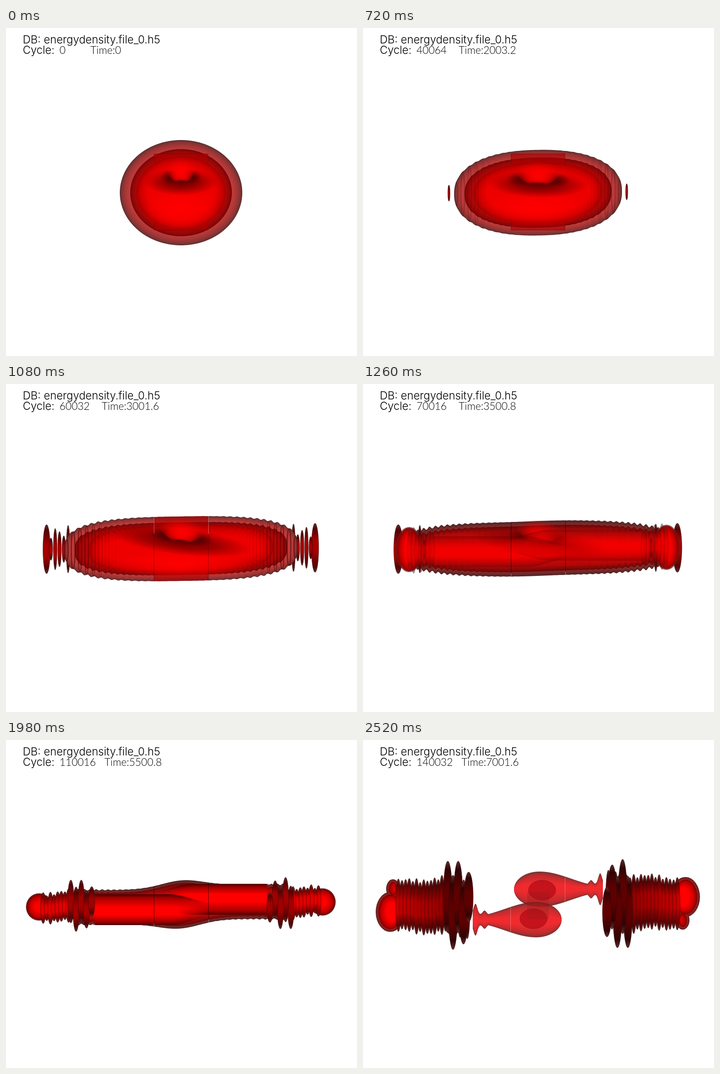
Write an HTML page with a canvas that moves like this. It is 774 px wide and 723 px high and loops after 2.7 s.

```html
<!DOCTYPE html>
<html lang="en">
<head>
<meta charset="utf-8">
<title>Energy density</title>
<style>
html, body { margin: 0; width: 774px; height: 723px; overflow: hidden; background: #fff; }
canvas { display: block; }
</style>
</head>
<body>
<canvas id="stage" width="774" height="723"></canvas>
<script>
const ctx = document.getElementById('stage').getContext('2d');
const CX = 385.5, CY = 362.5, STEP = 180, COUNT = 15;
const RED = '255,0,0', DARK = '60,0,0';
const lerp = (a, b, t) => a + (b - a) * t;
const clamp = v => Math.max(0, Math.min(1, v));
const smooth = (a, b, x) => { const t = clamp((x - a) / (b - a)); return t * t * (3 - 2 * t); };
const bell = (x, mid, w) => Math.exp(-(((x - mid) / w) ** 2));
const mix = (a, b, t) => `rgb(${a.map((v, i) => Math.round(lerp(v, b[i], t)))})`;

// Value of a quantity known at poses 6, 9, 11 and 14
function key(k, a, b, c, d) {
  if (k < 9) return lerp(a, b, (k - 6) / 3);
  return k < 11 ? lerp(b, c, (k - 9) / 2) : lerp(c, d, (k - 11) / 3);
}

function oval(x, y, rx, ry) {
  ctx.beginPath();
  ctx.ellipse(x, y, Math.max(rx, 0.5), Math.max(ry, 0.5), 0, 0, 7);
}

function glow(x, y, rx, ry, color, a) {
  ctx.save();
  ctx.translate(x, y);
  ctx.scale(rx, ry);
  const g = ctx.createRadialGradient(0, 0, 0, 0, 0, 1);
  [1, 0.6, 0].forEach((v, i) => g.addColorStop(i / 2, `rgba(${color},${a * v})`));
  ctx.fillStyle = g;
  ctx.fillRect(-1, -1, 2, 2);
  ctx.restore();
}

// Stack of shrinking outlines, shaded from rim to core
function shade(path, depth, rim, core) {
  for (let i = 0; i <= depth; i++) {
    path(i);
    ctx.fillStyle = mix(rim, core, Math.sqrt(i / depth));
    ctx.fill();
  }
}

function ramp(y0, y1, rim, side, core) {
  const g = ctx.createLinearGradient(0, y0, 0, y1);
  [rim, side, core, core, side, rim].forEach((c, i) =>
    g.addColorStop([0, 0.12, 0.42, 0.66, 0.88, 1][i], mix(c, c, 0)));
  return g;
}

// Body filled column by column, top and bottom given by fn
function skin(fn, x0, x1, colors, alpha = () => 1) {
  ctx.fillStyle = ramp(0, 1, ...colors);
  for (let x = Math.round(x0); x < x1; x++) {
    const [t, b] = fn(x + 0.5);
    if (b - t < 0.5) continue;
    ctx.save();
    ctx.globalAlpha *= clamp(alpha(x));
    ctx.translate(x, t);
    ctx.scale(1, b - t);
    ctx.fillRect(0, 0, 1, 1);
    ctx.restore();
  }
}

function disc(x, y, rx, ry, red) {
  ctx.fillStyle = ramp(y - ry, y + ry, [95, 45, 45], [red * 0.5, 4, 4], [red, 0, 0]);
  oval(x, y, rx, ry);
  ctx.fill();
  ctx.strokeStyle = 'rgba(45,10,10,.6)';
  ctx.stroke();
}

// The scene looks the same after half a turn
function twice(draw) {
  ctx.save();
  ctx.translate(2 * CX, 2 * CY);
  ctx.rotate(Math.PI);
  draw();
  ctx.restore();
  draw();
}

function eggSize(k) {
  const t = k / 6;
  return { rx: 135 + 122 * t ** 2.2, ry: 116 - 45 * t ** 1.8, n: 2 + t ** 3, t };
}

const eggHalf = (u, ry, n) => ry * (1 - clamp(Math.abs(u)) ** n) ** (1 / n);

function hole(k, strength) {
  const w = Math.min(50, 32 + 40 * (k / 6) ** 2), low = 338 + k * 1.3;
  const { rx } = eggSize(Math.min(k, 6));
  ctx.save();
  ctx.globalAlpha = strength;
  ctx.translate(386, low);
  ctx.rotate(0.12 * (Math.min(k, 6) / 6) ** 4);
  glow(0, 1, rx * 0.6, 30, '75,0,0', 0.85);
  for (const s of [-1, 1]) glow(s * w * 0.7, -9, w * 0.7, 16, DARK, 0.75);
  ctx.beginPath();
  ctx.moveTo(-w * 1.3, -50);
  ctx.quadraticCurveTo(-w, -10, -w * 0.4, 0);
  ctx.lineTo(w * 0.4, 0);
  ctx.quadraticCurveTo(w, -10, w * 1.3, -50);
  ctx.clip();
  glow(0, -19, w * 1.05, 30, RED, 1);
  glow(0, -14, w * 0.8, 18, RED, 0.8);
  glow(0, 0, w * 0.5, 4, DARK, 0.8);
  ctx.restore();
}

function egg(k, dx, dy) {
  const { rx, ry, n, t } = eggSize(k);
  const wave = k < 3 ? 0 : 4 * t * t, tilt = 0.015 * Math.min(1, k / 4);
  ctx.beginPath();
  for (let i = 0; i < 720; i++) {
    const a = i * Math.PI / 360, c = Math.cos(a);
    const u = Math.sign(c) * Math.abs(c) ** (2 / n);
    const ripple = wave * u * u * Math.sin(Math.abs(u) * rx * 0.42);
    const y = eggHalf(u, ry - dy, n) + ripple * Math.abs(Math.sin(a));
    ctx.lineTo(386 + u * (rx - dx), 363 + Math.sign(Math.sin(a)) * y - tilt * u * rx);
  }
  ctx.closePath();
}

// Thin plates thrown off both ends
function drawPlates(k) {
  const { rx } = eggSize(Math.min(k, 6));
  const left = CX - rx, tall = 15 + 15 * Math.min(2, k - 4);
  const outer = left - 11 - 3.5 * (k - 4) ** 3 * (k < 7 ? 1 : 0.42);
  twice(() => {
    for (let i = 0, x = outer; x < left + (k > 5 ? 14 : -4); x += 9.5, i++) {
      disc(x, 364, k < 5 ? 2.5 : i ? 4 : 2 * (k - 2), tall * (0.85 + 0.35 * Math.cos(i * 2.6)), 165);
    }
  });
}

function drawEgg(k) {
  const { rx, ry, n, t } = eggSize(k), s = t * t;
  if (k > 3) drawPlates(k);
  const layer = (dx, dy, ...look) => shade(i => egg(k, dx + i, dy + i), ...look);
  layer(0, 0, lerp(20, 12, s), [82, 45, 45], [190, 58, 58]);
  layer(23, 20 - 7 * s, 14, [105, 8, 8], [174, 6, 6]);
  ctx.save();
  egg(k, 0, 0);
  ctx.clip();
  ctx.fillStyle = 'rgba(172,0,0,.62)';
  ctx.fillRect(326, 277, 120, 169);
  ctx.strokeStyle = 'rgba(110,0,0,.45)';
  ctx.strokeRect(326.5, 277.5, 119, 168);
  layer(37 + 18 * s, 36 - 16 * s, 26, [158, 0, 0], [238, 0, 0]);
  glow(386, 398, rx * 0.62, ry * 0.42, RED, 1);
  // Folds near the ends
  for (let x = rx - 4; x > rx * 0.55 && k > 3; x -= 15) {
    const u = x / rx;
    ctx.strokeStyle = `rgba(80,0,0,${0.6 * s * smooth(0.5, 0.95, u)})`;
    ctx.lineWidth = 2.5;
    for (const side of [-1, 1]) {
      oval(386 + side * x, 363 - side * 3, 4, eggHalf(u, ry, n));
      ctx.stroke();
    }
  }
  ctx.lineWidth = 1;
  hole(k, 1);
  if (k > 5) for (const x of [326, 446]) {
    ctx.fillStyle = 'rgba(225,185,175,.5)';
    ctx.fillRect(x, 290, 1, 40);
    ctx.fillStyle = 'rgba(90,0,0,.5)';
    ctx.fillRect(x, 330, 1, 110);
  }
  ctx.restore();
}

function drawShell(k) {
  const s = clamp((k - 6) / 3), rx = CX - key(k, 128, 57, 44, 28);
  const x0 = key(k, 128, 90, 150, 150), x1 = 2 * CX - x0;
  const swell = key(k, 0, 4, 15, 15), amp = lerp(4, 2, s);
  const body = inset => x => {
    const d = Math.abs(x - CX), u = d / rx;
    const mid = CY + key(k, 1, 6, 6, 6) * Math.tanh((CX - x) / 70);
    const thin = 38 + swell * bell(x, CX, 65) + 10 * u ** 8;
    const ripple = amp * (d / (CX - x0)) ** 2 * Math.sin(d * 0.48);
    const half = lerp(eggHalf(u, 71, 3), thin, s) + ripple - inset;
    return [mid - half, mid + half];
  };
  ctx.save();
  ctx.globalAlpha = clamp(1 - (k - 11) * 0.55);
  skin(body(0), x0, x1, [[75, 38, 38], [165, 45, 45], [190, 40, 40]]);
  skin(body(key(k, 13, 3, 6, 6)), x0 + 6, x1 - 6, [[100, 8, 8], [175, 8, 8], [235, 0, 0]]);
  ctx.restore();
  return body(0);
}

// Front lobe: a tube that pinches into a bulb with a neck
function drawTube(k) {
  const g = clamp((k - 11) / 3);
  const x0 = key(k, 150, 135, 187, 242), end = key(k, 470, 500, 448, 438);
  const mid = key(k, 370, 369, 374, 396);
  const edge = x => {
    const plain = 34 * (1 - 0.55 * smooth(360, 455, x));
    const lobe = x < 382 ? bell(x, 382, 98) : Math.sqrt(clamp(1 - ((x - 382) / 56) ** 2));
    const foot = 24 * bell(x, 248, 6) + 9 * bell(x, 268, 6);
    const bulb = Math.max(39 * lobe, x < 382 ? 11 + foot : 0);
    const half = lerp(plain, bulb, g);
    return [mid - half, mid + half];
  };
  const tone = (a, b) => a.map((v, i) => lerp(v, b[i], g));
  ctx.save();
  ctx.globalAlpha = clamp((k - 6) / 3) * lerp(1, 0.92, g);
  skin(edge, x0, end, [
    tone([75, 0, 0], [105, 35, 35]), tone([165, 0, 0], [190, 25, 28]), tone([255, 0, 0], [238, 24, 28])
  ], x => k > 11 ? 1 : Math.min((end - x) / 70, (x - x0) / 12));
  ctx.globalAlpha = g;
  oval(376, 394, 30, 22);
  ctx.fillStyle = 'rgba(165,0,14,.55)';
  ctx.fill();
  ctx.strokeStyle = 'rgba(115,15,15,.5)';
  ctx.stroke();
  ctx.fillStyle = 'rgba(235,150,150,.6)';
  ctx.fillRect(325, mid - 27, 1, 54);
  ctx.restore();
}

function drawHead(k) {
  const g = clamp((k - 11) / 3), tip = key(k, 79, 57, 44, 28), end = key(k, 160, 150, 186, 238);
  const mid = key(k, 365, 365, 368, 366), r = key(k, 30, 30, 29, 32), tall = key(k, 50, 50, 30, 44);
  const start = tip + key(k, 32, 32, 38, 50);
  const near = key(k, 48, 48, 31, 55), far = key(k, 40, 40, 36, 66);
  const rim = [80, 35, 35], film = [160, 30, 30];
  ctx.save();
  ctx.globalAlpha = clamp((k - 6) / 2);
  // Rounded cap, with a second bump when it splits
  const lobes = [[tip + r, mid + 13 * g, r, tall], [tip + 38, mid - 38 * g, 15 * g, 21 * g]];
  const inset = lerp(2, 6, g);
  for (const [x, y, rx, ry] of lobes) shade(i => oval(x, y, rx - i, ry - i), inset, rim, film);
  for (const [x, y, rx, ry] of lobes) {
    shade(i => oval(x + i * 0.3, y, rx - inset - i, ry - inset - i * 1.3), 14, [110, 0, 0], [255, 0, 0]);
  }
  for (let x = start; x < end; x += 8) {
    const t = (x - start) / (end - start);
    disc(x, mid + 3 * Math.sin(x * 7), 6, lerp(near, far, t) + 4 * Math.sin(x * 12.9),
      lerp(225, 120, g * (0.3 + 0.7 * t)));
  }
  // Tall flare behind the stack
  for (let i = 0; i < 5 && k > 10; i++) {
    const y = lerp(366, i % 2 ? 380 : 346, lerp(0.5, 1, g));
    disc(187 + 11.5 * i - 44 * (1 - g), y, lerp(7, 10, g),
      (82 - 3 * (i - 1) ** 2) * lerp(0.6, 1, g), lerp(160, 95, g));
  }
  ctx.restore();
}

function drawStretched(k) {
  const body = drawShell(k);
  if (k < 8) drawPlates(k);
  if (k < 9) hole(k, (9 - k) / 3);
  twice(() => drawTube(k));
  if (k > 11) {
    ctx.fillStyle = `rgba(150,25,25,${0.1 * (k - 11)})`;
    ctx.fillRect(362, 335, 48, 60);
  }
  twice(() => drawHead(k));
  if (k > 11) return;
  for (const x of [326, 446]) {
    const [t, b] = body(x);
    ctx.fillStyle = 'rgba(35,0,0,.75)';
    ctx.fillRect(x, t, 1, b - t);
    ctx.fillStyle = 'rgba(225,185,175,.65)';
    ctx.fillRect(x, b - 7, 1, 7);
  }
}

function drawText(k) {
  const cycle = k ? (Math.floor(k * 156.25) + 1) * 64 : 0;
  const put = (font, s, x, y) => {
    ctx.font = `300 ${font}, "Open Sans", sans-serif`;
    ctx.fillText(s, x, y);
  };
  ctx.fillStyle = '#000';
  put('24px Inter', 'DB: energydensity.file_0.h5', 37, 34);
  put('24px Inter', 'Cycle:', 37, 57);
  put('23px Lato', String(cycle), 118, 57);
  put('23px Lato', 'Time:' + cycle / 20, !k ? 186 : cycle < 1e5 ? 211 : 217, 57);
}

let shown = -1;
function tick() {
  const k = Math.floor(performance.now() / STEP) % COUNT;
  if (k !== shown) {
    shown = k;
    ctx.fillStyle = '#fff';
    ctx.fillRect(0, 0, 774, 723);
    ctx.lineWidth = 1;
    if (k < 7) drawEgg(k);
    else drawStretched(k);
    drawText(k);
  }
  requestAnimationFrame(tick);
}
tick();
</script>
</body>
</html>
```
